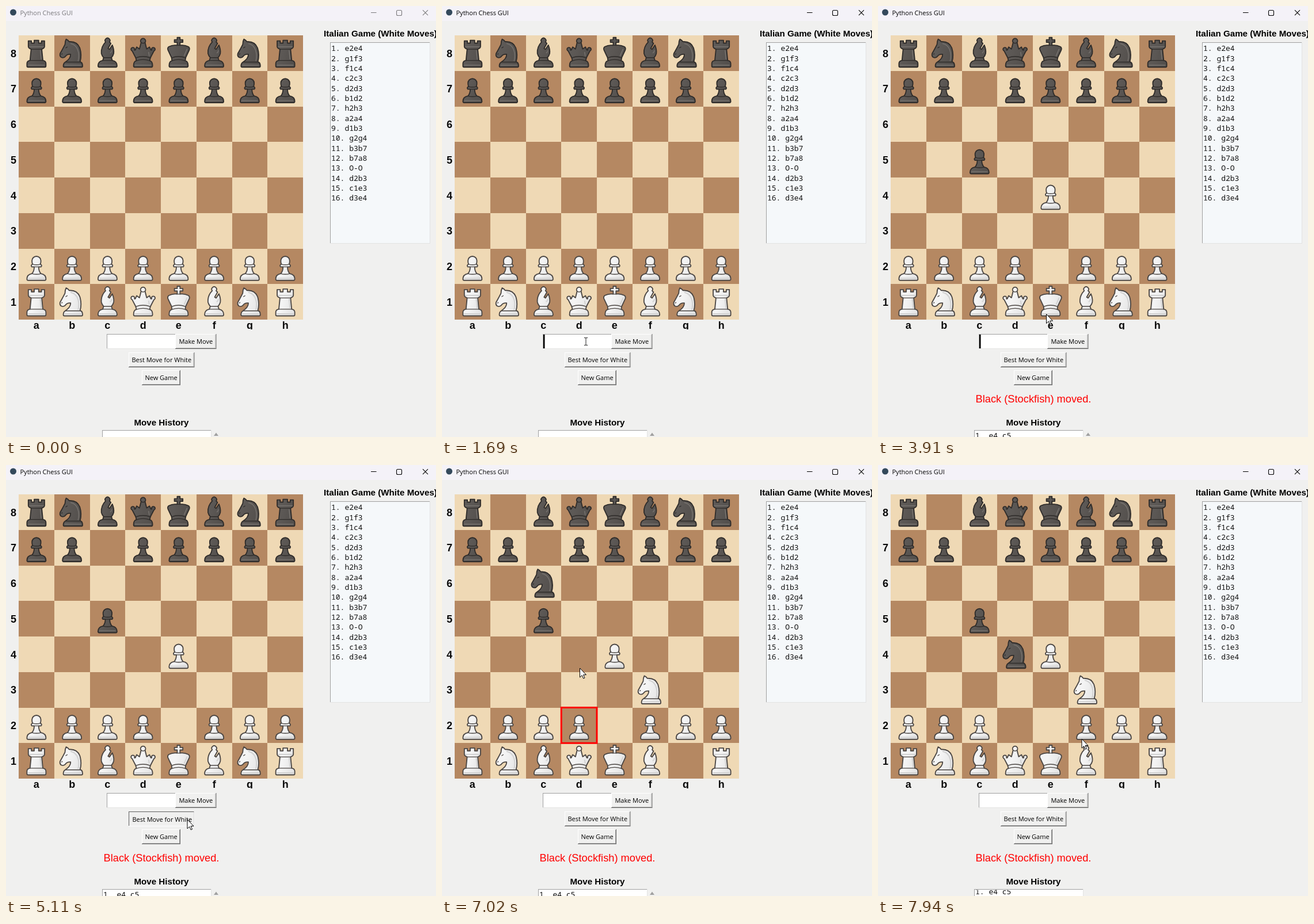
Recreate the animation shown at these times as an HTML page. Size 747x749 px, loop 8000 ms.

```html
<!DOCTYPE html>
<html lang="en">
<head>
<meta charset="utf-8">
<title>Python Chess GUI</title>
<style>
  html, body { margin: 0; width: 100%; height: 100%; overflow: hidden; background: #f0f0ef; }
  svg { display: block; width: 747px; height: 749px; }
  text { white-space: pre; fill: #000; }
  .ui { font: 11px "Open Sans", "Noto Sans", sans-serif; }
  .mid { text-anchor: middle; }
  .label { font: bold 18px "Liberation Sans", Arial, sans-serif; fill: #0a0a0a; }
  .head { font: bold 15.15px "Liberation Sans", Arial, sans-serif; }
  .big { font: 18.25px "Liberation Sans", Arial, sans-serif; }
  .mono { font: 13px "Noto Sans Mono", "DejaVu Sans Mono", monospace; fill: #111; }
  .w { fill: url(#white); stroke: #4b4643; }
  .b { fill: url(#black); stroke: #2f2c2a; }
  .piece { stroke-width: 1.9; stroke-linejoin: round; stroke-linecap: round; }
  .piece .line { fill: none; stroke-width: 1.4; }
  .w .soft { fill: none; stroke: #d2d2d2; stroke-width: 2; }
  .b .soft { fill: none; stroke: #75716d; stroke-width: 1.6; }
</style>
</head>
<body>
<svg id="stage" viewBox="0 0 747 749" xmlns="http://www.w3.org/2000/svg">
  <defs>
    <linearGradient id="white" x1="0" x2="1" y1="0" y2="0.3">
      <stop offset="0.45" stop-color="#f4f4f4"/><stop offset="1" stop-color="#e6e6e6"/>
    </linearGradient>
    <linearGradient id="black" x1="0" x2="1" y1="0" y2="0.3">
      <stop offset="0.3" stop-color="#5e5a57"/><stop offset="1" stop-color="#54504d"/>
    </linearGradient>
    <clipPath id="boardClip"><rect width="530" height="562"/></clipPath>
    <clipPath id="logClip"><rect x="168" y="738.5" width="188" height="12"/></clipPath>
  </defs>
</svg>
<script>
const LOOP = 8000, X0 = 22, Y0 = 51, SQ = 61.75;
const stage = document.getElementById('stage');

function add(tag, attrs, parent = stage, text) {
  const el = document.createElementNS('http://www.w3.org/2000/svg', tag);
  for (const k in attrs) el.setAttribute(k, attrs[k]);
  if (text !== undefined) el.textContent = text;
  parent.append(el);
  return el;
}
const rect = (x, y, width, height, fill, parent) => add('rect', { x, y, width, height, fill }, parent);
const label = (x, y, cls, text, parent) => add('text', { x, y, class: cls }, parent, text);
const path = (d, attrs, parent) => add('path', { d, ...attrs }, parent);
const show = (el, on) => el.setAttribute('visibility', on ? 'visible' : 'hidden');
const move = (el, x, y) => el.setAttribute('transform', `translate(${x} ${y})`);

// Window frame
rect(0, 0, 747, 749, '#f0f0ef');
rect(0, 0, 747, 26, '#f4f2f8');
add('circle', { cx: 12.5, cy: 11, r: 5.5, fill: '#34495c' });
const titleBar = add('g', {});
label(24.5, 15.5, 'ui', 'Python Chess GUI', titleBar);
path('M634 11.5H643.5M680.5 7.5H685.5Q687.5 7.5 687.5 9.5V14.5Q687.5 16.5 685.5 16.5H680.5Q678.5 16.5 678.5 14.5V9.5Q678.5 7.5 680.5 7.5ZM724 7.2L733 16.2M733 7.2L724 16.2',
  { fill: 'none', stroke: '#000', 'stroke-width': 1.1 }, titleBar);

// Board
const board = add('g', { 'clip-path': 'url(#boardClip)', 'shape-rendering': 'crispEdges' });
rect(X0, Y0, SQ * 8, SQ * 8, '#efd9b5', board);
for (let i = 0; i < 64; i++) {
  const c = i % 8, r = i >> 3;
  if ((c + r) % 2) rect(X0 + c * SQ, Y0 + r * SQ, SQ, SQ, '#b58862', board);
}
for (let i = 0; i < 8; i++) {
  label(13, Y0 + i * SQ + 37.5, 'label mid', 8 - i, board);
  label(X0 + (i + .5) * SQ, 560.5, 'label mid', 'abcdefgh'[i], board);
}

// Pieces: outline, inner lines, soft shading
const FOOT = 'Q48 46 48 54Q48 56.5 46 56.5H16Q14 56.5 14 54Q14 46 ';
const SHAPES = {
  p: ['M23 44.5Q27 40 27 32.5H23Q20 30 24 27.5Q23 25 23 21.5A8 8 0 0 1 39 21.5Q39 25 38 27.5Q42 30 39 32.5H35Q35 40 39 44.5' + FOOT + '23 44.5Z',
    'M24 27.5Q31 30 38 27.5M27 32.5H35M23 44.5Q31 47 39 44.5', 'M17 53H45'],
  r: ['M16.5 9.5H22V13.5H27V8.5H35V13.5H40V9.5H45.5V19.5Q45.5 22.5 40.5 24.5L42.5 44.5Q48 45.5 48 50V54.5Q48 56.5 46 56.5H16Q14 56.5 14 54.5V50Q14 45.5 19.5 44.5L21.5 24.5Q16.5 22.5 16.5 19.5Z',
    'M21.5 24.5H40.5M19.5 44.5H42.5', 'M18.5 20H43.5M38 27L39.5 42M17 53H45'],
  n: ['M19 47.5Q29 41 28.5 33.5Q22 33 19.5 37Q16 41 12 39Q8.5 37 9.8 32Q15 23 18.5 16Q18.5 10 20.5 6.5Q24 8 26 11Q40 10 45 22Q49 35 45.5 47Q50 48 50 54.5Q50 56.5 48 56.5H17.5Q15.5 56.5 15.5 54.5Q15.5 49.5 19 47.5Z',
    'M19 47.5H45.5M20 22L22.5 20.5M12.5 33.5L13.5 32.5', 'M29 14.5Q41 17 43 33Q43.5 41 42 45M18.5 53H47'],
  b: ['M27.5 11.5A4.4 4.4 0 1 1 34.5 11.5L37 14L32 23L34.5 24.5L39.5 17Q43 25 42 32Q41 36 38 39.5L39.5 44.5' + FOOT + '22.5 44.5L24 39.5Q21 36 20 32Q19 20 27.5 11.5Z',
    'M24 39.5H38M22.5 44.5H39.5', 'M36 31Q38 30 38.5 27M17 53H45'],
  q: ['M27.5 12.5A4.5 4.5 0 1 1 34.5 12.5L37.5 24L42.5 20.5L45 26L46.5 26A3.2 3.2 0 1 1 50.5 27.5L44 40L43 45' + FOOT + '19 45L18 40L11.5 27.5A3.2 3.2 0 1 1 15.5 26L17 26L19.5 20.5L24.5 24Z',
    'M18 40Q31 35 44 40M19 45Q31 41 43 45M27.5 12.5Q31 15 34.5 12.5', 'M17 53H45M41 30L42 36'],
  k: ['M28.5 3.5H33.5V7.5H38.5V12H33.5V17.5Q42 16.5 48.5 20Q51.5 22 50 26L43.5 40L43 45' + FOOT + '19 45L18.5 40L12 26Q10.5 22 13.5 20Q20 16.5 28.5 17.5V12H23.5V7.5H28.5Z',
    'M18.5 40Q31 35 43.5 40M19 45Q31 41 43 45M28.5 17.5H33.5', 'M17 53H45M46 24.5L41 36']
};

const pieces = {};
function put(el, square) {
  const x = X0 + 'abcdefgh'.indexOf(square[0]) * SQ, y = Y0 + (8 - square[1]) * SQ;
  el.setAttribute('transform', `translate(${x + .8} ${y + .4}) scale(.97)`);
}
function addPiece(kind, side, square) {
  const g = add('g', { class: 'piece ' + side });
  const [outline, lines, soft] = SHAPES[kind];
  path(outline, {}, g);
  path(soft, { class: 'soft' }, g);
  path(lines, { class: 'line' }, g);
  put(g, square);
  pieces[square] = g;
}
[...'rnbqkbnr'].forEach((kind, i) => {
  const file = 'abcdefgh'[i];
  addPiece(kind, 'b', file + 8);
  addPiece('p', 'b', file + 7);
  addPiece('p', 'w', file + 2);
  addPiece(kind, 'w', file + 1);
});
const marker = add('rect', { x: X0 + 3 * SQ, y: Y0 + 6 * SQ, width: SQ, height: SQ, fill: 'none', stroke: '#f00', 'stroke-width': 3 });

// Each route starts on the piece's home square; a null square means captured
const ROUTES = {
  e2: [[3110, 'e4']],
  c7: [[3690, 'c5']],
  g1: [[5170, 'f3']],
  b8: [[5730, 'c6'], [7720, 'd4']],
  d2: [[7160, 'd4'], [7720, null]]
};

// Opening list
function sunken(x, y, w, h, fill) {
  rect(x, y, w, h, '#e3e3e3');
  rect(x, y, w - 1, h - 1, '#a0a0a0');
  rect(x + 1, y + 1, w - 2, h - 2, fill);
}
label(552, 53, 'head', 'Italian Game (White Moves)');
sunken(563, 63, 174, 350, '#f5f8fa');
'e2e4 g1f3 f1c4 c2c3 d2d3 b1d2 h2h3 a2a4 d1b3 g2g4 b3b7 b7a8 O-O d2b3 c1e3 d3e4'.split(' ')
  .forEach((m, i) => label(565, 78.3 + i * 17.33, 'mono', `${i + 1}. ${m}`));

// Controls
sunken(175, 570, 120, 26, '#fff');
const typed = label(177.5, 589, 'big', '');
const caret = rect(176, 571, 2.5, 24, '#000');

function button(x, y, w, text) {
  const g = add('g', {}), h = 26;
  const outer = rect(x, y, w, h, '', g), light = rect(x, y, w - 1, h - 1, '', g);
  const dark = rect(x + 1, y + 1, w - 2, h - 2, '', g), face = rect(x + 1, y + 1, w - 3, h - 3, '#f0f0ef', g);
  const caption = label(x + w / 2, y + 17, 'ui mid', text, g);
  return down => {
    outer.setAttribute('fill', down ? '#fff' : '#696969');
    light.setAttribute('fill', down ? '#696969' : '#fff');
    dark.setAttribute('fill', down ? '#e3e3e3' : '#a0a0a0');
    move(face, +down, +down);
    move(caption, +down, +down);
  };
}
button(294, 570, 71.5, 'Make Move')(false);
const pressBest = button(213, 602, 114.5, 'Best Move for White');
button(236, 633, 67, 'New Game')(false);

const status = label(270, 689, 'big mid', 'Black (Stockfish) moved.');
status.style.fill = '#f00';
label(270, 729, 'head mid', 'Move History');
sunken(167, 737, 190, 30, '#fff');
const log = label(169, 750.5, 'mono', '', add('g', { 'clip-path': 'url(#logClip)' }));
const arrowUp = path('M361 747L365 741.5L369 747Z', { fill: '#a0a0a0' });

// Pointer
const arrow = path('M0 0V16L3.7 12.5L6.2 18L8.5 17L6.1 11.6H11Z', { fill: '#fff', stroke: '#000', 'stroke-width': 1 });
const beam = path('M-3 -6.5H-1Q0 -6.5 0 -5.5Q0 -6.5 1 -6.5H3M0 -5.5V5.5M-3 6.5H-1Q0 6.5 0 5.5Q0 6.5 1 6.5H3',
  { fill: 'none', stroke: '#222', 'stroke-width': 1 });
const TRACK = [
  [70, 623, 709], [520, 250, 583], [3690, 250, 583], [3900, 292.5, 535.5], [4440, 328, 611],
  [4510, 328, 611], [4780, 315, 616], [5590, 315, 616], [6010, 241.5, 460.5], [6610, 241, 459],
  [7010, 239.5, 353], [7360, 239.5, 353], [7930, 354, 476]
];
function pointerAt(t) {
  const i = TRACK.findIndex(k => k[0] > t);
  if (i < 0) return TRACK[TRACK.length - 1].slice(1);
  const [t0, x0, y0] = TRACK[i - 1], [t1, x1, y1] = TRACK[i];
  const u = (t - t0) / (t1 - t0), e = u * u * (3 - 2 * u);
  return [x0 + (x1 - x0) * e, y0 + (y1 - y0) * e];
}

const within = (t, a, b) => t >= a && t < b;
const KEYS = [2090, 2200, 2520, 2840];

function render(t) {
  const active = Math.min(1, Math.max(0, (t - 500) / 300));
  titleBar.setAttribute('opacity', 0.5 + active * 0.5);

  const count = t < 3110 ? KEYS.filter(k => t >= k).length : 0;
  typed.textContent = 'e2e4'.slice(0, count);
  caret.setAttribute('x', 176 + count * 10.15 + (count ? 1.5 : 0));
  show(caret, t >= 773 && (t - 773) % 917 < 600);

  for (const home in ROUTES) {
    let square = home;
    for (const [at, to] of ROUTES[home]) if (t >= at) square = to;
    show(pieces[home], square);
    if (square) put(pieces[home], square);
  }
  show(marker, within(t, 6610, 7160));
  pressBest(within(t, 4990, 5170));
  show(status, within(t, 3690, 5170) || within(t, 5730, 7160) || t >= 7720);

  log.textContent = t < 3110 ? '' : t < 3690 ? '1. e4' : '1. e4 c5';
  log.setAttribute('y', t < 7720 ? 750.5 : 745.5);
  show(arrowUp, t < 7720);

  const seen = t >= 70, [x, y] = seen ? pointerAt(t) : [0, 0];
  const inEntry = within(x, 176, 294) && within(y, 570, 596);
  show(arrow, seen && !inEntry);
  show(beam, seen && inEntry);
  move(arrow, x, y);
  move(beam, x, y);
}

const start = performance.now();
function tick() {
  render((performance.now() - start) % LOOP);
  requestAnimationFrame(tick);
}
tick();
</script>
</body>
</html>
```
